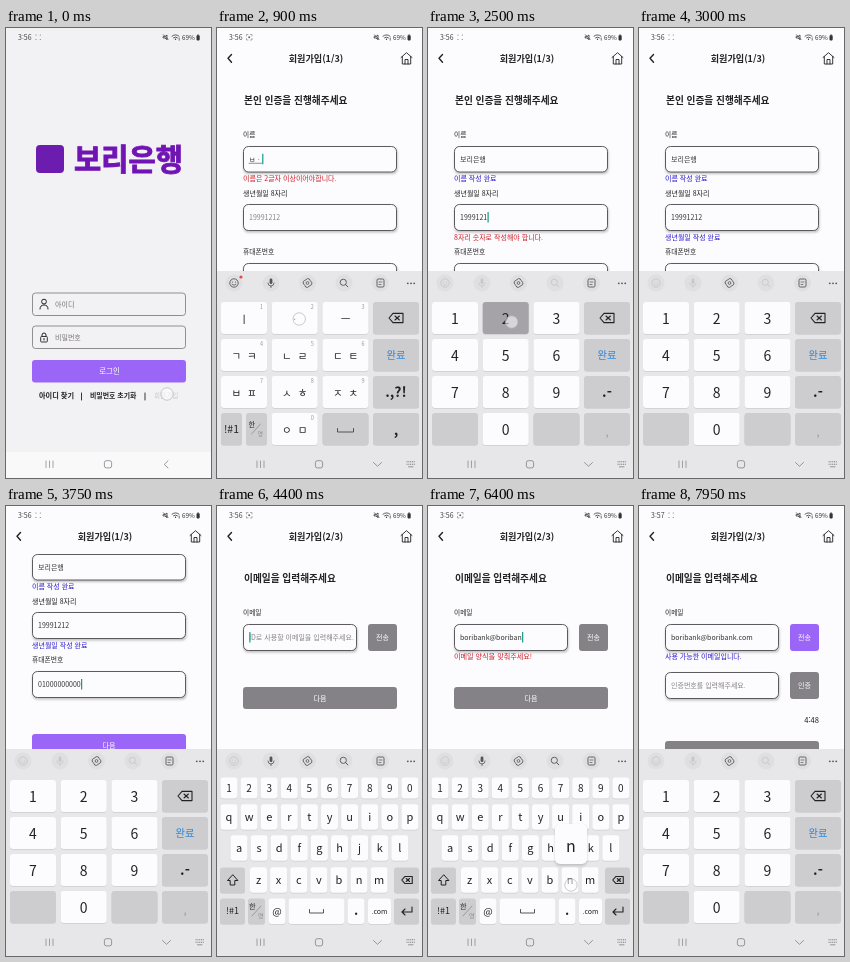
An HTML page that plays this animation: 205x450 px, repeating every 8 s.

```html
<!DOCTYPE html>
<html lang="ko">
<head>
<meta charset="utf-8">
<title>회원가입</title>
<style>
  html, body { margin: 0; width: 100%; height: 100%; overflow: hidden; background: #fcfbfd; }
  svg { display: block; width: 100vw; height: 100vh; }
  text { font-family: "Noto Sans CJK KR", "Noto Sans CJK JP", "Noto Sans CJK", "Noto Sans", sans-serif; white-space: pre; }
</style>
</head>
<body>
<svg id="stage" viewBox="0 0 205 450" preserveAspectRatio="none">
  <defs>
    <clipPath id="body"><rect y="48" width="205" height="402"/></clipPath>
    <filter id="soft" x="-10%" y="-30%" width="120%" height="180%"><feGaussianBlur stdDeviation="1"/></filter>
  </defs>
  <g id="scene"></g>
</svg>
<script>
const LOOP = 8000;
const INK = '#222', GRAY = '#858287', PURPLE = '#9b66f7', RED = '#cc1f2a', BLUE = '#2b1bd0';
const PAGE = '#fcfbfd', BOARD = '#e7e7e9', KEY = '#fcfbfd', FUNC = '#cdcccf', ICON = '#555';
const BANK = '보리은행', MAIL = 'boribank@boribank.com';
const scene = document.getElementById('scene');
const pen = document.createElement('canvas').getContext('2d');

const clamp = (v) => Math.max(0, Math.min(1, v));
const ease = (t, a, b) => { const p = clamp((t - a) / (b - a)); return p * p * (3 - 2 * p); };
const between = (t, a, b) => t >= a && t < b;

// Drawing helpers: text is centred vertically on y
const text = (x, y, s, size, fill = INK, anchor = 'start', weight = 500) =>
  `<text x="${x}" y="${y + size * 0.36}" font-size="${size}" fill="${fill}" text-anchor="${anchor}" font-weight="${weight}">${s}</text>`;
const mid = (x, y, s, size, fill, weight) => text(x, y, s, size, fill, 'middle', weight);
const rect = (x, y, w, h, fill, r = 0, extra = '') =>
  `<rect x="${x}" y="${y}" width="${w}" height="${h}" rx="${r}" fill="${fill}" ${extra}/>`;
const circle = (x, y, r, fill, extra = '') => `<circle cx="${x}" cy="${y}" r="${r}" fill="${fill}" ${extra}/>`;
const line = (d, color = INK, w = 1) =>
  `<path d="${d}" fill="none" stroke="${color}" stroke-width="${w}" stroke-linecap="round" stroke-linejoin="round"/>`;
const group = (s, y = 0, opacity = 1) => `<g transform="translate(0 ${y})" opacity="${opacity}">${s}</g>`;
const ring = (x, y) => circle(x, y, 6.2, '#fff', 'fill-opacity=".55" stroke="#b3b1b5" stroke-width=".7"');
const button = (x, y, w, h, s, on) => rect(x, y, w, h, on ? PURPLE : GRAY, 3) + mid(x + w / 2, y + h / 2, s, 7, '#fff');
const width = (s, size) => {
  pen.font = `500 ${size}px "Noto Sans CJK KR", "Noto Sans CJK JP", "Noto Sans CJK", "Noto Sans", sans-serif`;
  return pen.measureText(s).width;
};

function field(x, y, w, h, value, hint, focus, blink, compose = 0) {
  let s = rect(x + 0.5, y + 1.6, w, h, '#77747a', 5, 'opacity=".45" filter="url(#soft)"');
  s += rect(x + 0.5, y + 0.5, w - 1, h - 1, PAGE, 5, 'stroke="#4c4a4e" stroke-width=".9"');
  s += text(x + 6, y + h / 2, value || hint, 7, value ? '#333' : '#858287');
  const end = x + 6 + width(value, 7);
  if (compose) {
    const from = x + 6 + width(value.slice(0, -compose), 7);
    s += line(`M${from} ${y + h / 2 + 4}H${end}`, '#444', 0.6);
  }
  if (focus && blink) s += rect(end + 0.3, y + h / 2 - 5.5, 1.2, 10.5, '#159a8b');
  return s;
}

// Typing plans
const PLUS = [
  ['ㅂ', 0, 2], ['ㅂㆍ', 1, 0], ['보', 2, 0], ['본', 1, 1], ['볼', 1, 1], ['보리', 0, 0],
  ['보링', 1, 3], ['보리으', 2, 0], ['보리은', 1, 1], ['보리은ㅅ', 1, 2], ['보리은ㅎ', 1, 2],
  ['보리은히', 0, 0], ['보리은하', 1, 0], ['보리은해', 0, 0], [BANK, 1, 3]
];
const BIRTH = '19991212', PHONE = '01000000000';
const nameAt = (i) => 840 + 50 * i;
const birthAt = (i) => i ? 1680 + 120 * i : 1725;
const phoneAt = (i) => 3270 + 44 * i;
const mailAt = (i) => i < 17 ? 4850 + 103 * i : 6620;
const count = (t, n, at) => { let i = 0; while (i < n && t >= at(i)) i++; return i; };
const colX = [27, 77.7, 128.5, 179], rowY = [290, 327, 364, 401];
const digitCell = (d) => +d ? [(d - 1) % 3, Math.floor((d - 1) / 3)] : [1, 3];

const ROWS = [['1234567890', 12, 282], ['qwertyuiop', 12, 311], ['asdfghjkl', 22, 342], ['zxcvbnm', 41.5, 374]];
function letterKey(c) {
  if (c === '@') return [60, 405];
  for (const [keys, x, y] of ROWS) if (keys.includes(c)) return [x + 20.1 * keys.indexOf(c), y];
}

// Which key is down now
function pressed(t) {
  const i = count(t, PLUS.length, nameAt) - 1;
  if (i >= 0 && t < nameAt(i) + 42) return { cell: PLUS[i].slice(1) };
  for (const [s, at, lead] of [[BIRTH, birthAt, 60], [PHONE, phoneAt, 34]]) {
    const n = count(t, s.length, at);
    if (n < s.length && t >= at(n) - lead && t > 1740) return { cell: digitCell(s[n]), dark: true };
  }
  const m = count(t, MAIL.length, mailAt) - 1;
  if (m >= 0 && m < 17 && t < mailAt(m) + 75) return { letter: MAIL[m] };
  if (between(t, 6620, 6700)) return { spot: [162, 405] };
  return {};
}

// Chrome
function statusBar(t) {
  let s = text(12, 9.3, t < 6700 ? '3:56' : '3:57', 7, '#444');
  const rec = t % 600;
  if (between(rec, 175, 475)) {
    s += line('M29.5 8V6.5H31M33.5 6.5H35V8M35 10.5V12H33.5M31 12H29.5V10.5', '#777', 0.6) + circle(32.2, 9.2, 1, '#666');
  } else {
    for (const [x, y] of [[30, 7], [34.3, 7], [30, 11.5], [34.3, 11.5]]) s += circle(x, y, 0.6, '#777');
  }
  s += line('M157.5 8.6H158.8L161 7V11.6L158.8 10H157.5ZM157.5 6.8L162 11.6', '#333', 0.8);
  s += line('M166 8.2Q169.5 5.4 173 8.2M167.5 9.8Q169.5 8.2 171.5 9.8', '#333', 0.8) + circle(169.5, 11.3, 0.7, '#333') + line('M173.2 10V12.2', '#333', 0.7);
  return s + text(176, 9.4, '69%', 6.3, '#333') + rect(190.5, 7.2, 3.2, 5.2, '#333', 0.8) + rect(191.4, 6.5, 1.4, 1, '#333');
}

function navBar(k) {
  const c = '#807e82';
  let s = line('M40 433V439.5M43.5 433V439.5M47 433V439.5', c, 0.7);
  s += rect(98.4, 432.7, 7.2, 7.2, 'none', 2, `stroke="${c}" stroke-width=".8"`);
  s += k > 0.5 ? line('M156.5 434.5L160.5 438.3L164.5 434.5', c, 0.8) : line('M162 432.8L158.3 436.4L162 440', c, 0.8);
  if (k > 0.5) {
    for (const y of [433.8, 436.2]) s += `<path d="M189.5 ${y}H198" stroke="${c}" stroke-width="1.1" stroke-dasharray="1.1 .7"/>`;
    s += line('M191.5 438.8H196', c, 0.8);
  }
  return s;
}

const header = (n) => line('M14.5 26.5L11 30.3L14.5 34.2', INK, 1.4) + mid(99, 30.3, `회원가입(${n}/3)`, 9.1, INK, 700) +
  line('M184 29.5L189.5 24.7L195 29.5M185.3 28.5V36H193.7V28.5M188 36V31.5H191V36', INK, 0.9);

// Pages
function login() {
  let s = rect(0, 0, 205, 424, '#f2f1f3') + rect(0, 424, 205, 26, '#f9f9fa');
  s += rect(30, 117, 28, 28, '#6d1cb0', 4);
  s += `<g stroke="#7114b4" stroke-width=".9">${text(68, 131, BANK, 29.6, '#7114b4', 'start', 900)}</g>`;
  const rows = [[265, '아이디'], [298, '비밀번호']];
  for (const [y, label] of rows) {
    s += rect(26.5, y, 153, 22.5, '#f2f1f3', 3, 'stroke="#77747a" stroke-width=".8"') + text(49, y + 11.2, label, 7, '#77747a');
  }
  s += circle(38, 273.6, 2.4, 'none', `stroke="${INK}"`) + line('M34 281Q34 277 38 277Q42 277 42 281');
  s += rect(34.7, 308.5, 6.6, 5.5, 'none', 0.8, `stroke="${INK}" stroke-width=".9"`) + line('M36 308V307Q36 305 38 305Q40 305 40 307V308M38 310.5V312');
  s += rect(26, 332, 154, 22.5, PURPLE, 3) + mid(103.5, 343, '로그인', 7.5, '#fff');
  s += text(33, 367.5, '아이디 찾기', 7.2, INK, 'start', 700) + text(84, 367.5, '비밀번호 초기화', 6.9, INK, 'start', 700);
  return s + line('M75.5 365V372M139 365V372', INK, 0.9) + text(148, 367.5, '회원가입', 6.6, '#c9c7cb');
}

function identity(t, blink) {
  const step = count(t, PLUS.length, nameAt);
  const name = step ? PLUS[step - 1][0] : '';
  const birth = BIRTH.slice(0, count(t, BIRTH.length, birthAt));
  const phone = PHONE.slice(0, count(t, PHONE.length, phoneAt));
  const composing = t < 1600 && name ? (step === 2 ? 2 : 1) : 0;
  let s = text(27, 72.5, '본인 인증을 진행해주세요', 9.7, INK, 'start', 700);
  s += text(26, 107, '이름', 6.7) + field(26, 118, 154, 26.5, name, '이름', between(t, 420, 1700), blink, composing);
  if (step) s += step < 6 ? text(26, 150, '이름은 2글자 이상이어야합니다.', 7, RED) : text(26, 150, '이름 작성 완료', 7, BLUE);
  s += text(26, 165.5, '생년월일 8자리', 7) + field(26, 176, 154, 27, birth, '19991212', between(t, 1700, 2850), blink);
  if (birth) s += birth.length < 8 ? text(26, 209, '8자리 숫자로 작성해야 합니다.', 7, RED) : text(26, 209, '생년월일 작성 완료', 7, BLUE);
  s += text(26, 224, '휴대폰번호', 6.8) + field(26, 235, 154, 27, phone, "'-' 없이 입력해주세요.", between(t, 2850, 3800), blink);
  s += button(26, 298, 154, 22, '다음', phone.length === PHONE.length);
  const scroll = 70 * ease(t, 3060, 3240);
  return rect(0, 0, 205, 450, PAGE) + `<g clip-path="url(#body)">${group(s, -scroll)}</g>` + header(1);
}

function email(t, blink) {
  const n = count(t, MAIL.length, mailAt), value = MAIL.slice(0, n), full = n === MAIL.length;
  const sent = t >= 7050;
  let s = rect(0, 0, 205, 450, PAGE) + header(2);
  s += text(27, 72.5, '이메일을 입력해주세요', 9.7, INK, 'start', 700) + text(26, 107, '이메일', 6.7);
  s += field(26, 118, 114, 27, value, 'ID로 사용할 이메일을 입력해주세요.', between(t, 4250, 7390), blink);
  s += button(151, 118, 29, 27, '전송', full);
  if (n) s += full ? text(26, 150, '사용 가능한 이메일입니다.', 7, BLUE) : text(26, 150, '이메일 양식을 맞춰주세요!', 7.1, RED);
  if (!sent) return s + button(26, 181, 154, 22, '다음');
  s += field(26, 166, 114, 27, '', '인증번호를 입력해주세요.', t >= 7390, blink) + button(151, 166, 29, 27, '인증');
  s += text(180, 214, '4:' + (52 - Math.min(4, Math.floor((t - 7050) / 210))), 7.6, INK, 'end');
  return s + button(26, 235, 154, 22, '다음');
}

// Keyboards
function toolbar(mode) {
  const tone = (on) => on ? ICON : '#c9c7cb';
  const plus = mode === 'plus', num = mode === 'num';
  let s = '';
  for (const x of [17, 54, 90.5, 127, 163.5]) s += circle(x, 255, 8.5, '#dfdee1');
  let c = tone(plus);
  s += circle(17, 255, 4.2, 'none', `stroke="${c}" stroke-width=".9"`) + circle(15.5, 254, 0.6, c) + circle(18.5, 254, 0.6, c) + line('M15 256.3Q17 258.6 19 256.3', c, 0.8);
  if (plus) s += circle(24, 249, 1.6, '#e5484d');
  c = tone(!num);
  s += rect(52.6, 250.5, 2.8, 5.6, c, 1.4) + line('M50.9 255Q51 258 54 258Q57 258 57.1 255M54 258V259.6', c, 0.8);
  const gear = Array.from({ length: 16 }, (_, i) => {
    const a = i * Math.PI / 8, r = i % 4 < 2 ? 4.4 : 3.7;
    return `${(90.5 + r * Math.cos(a)).toFixed(2)} ${(255 + r * Math.sin(a)).toFixed(2)}`;
  });
  s += line(`M${gear.join('L')}Z`, ICON, 0.9) + circle(90.5, 255, 1.4, 'none', `stroke="${ICON}" stroke-width=".8"`);
  s += circle(126.3, 254.3, 3.1, 'none', `stroke="${c}" stroke-width=".9"`) + line('M128.6 256.6L130.8 258.8', c);
  s += rect(160, 251, 7, 8, 'none', 1.2, `stroke="${ICON}" stroke-width=".9"`) + line('M162 254H165M162 256.5H164', ICON, 0.7);
  for (const x of [190.8, 194, 197.2]) s += circle(x, 255.3, 0.9, ICON);
  return s;
}

const key = (x, y, w, h, fill = KEY) => rect(x, y + 0.8, w, h, '#c3c1c5', 3, 'opacity=".7"') + rect(x, y, w, h, fill, 3);
const erase = (x, y, k) => line(`M${x - 7 * k} ${y}L${x - 3 * k} ${y - 4.6 * k}H${x + 7 * k}V${y + 4.6 * k}H${x - 3 * k}ZM${x - k} ${y - 2 * k}L${x + 3.4 * k} ${y + 2 * k}M${x + 3.4 * k} ${y - 2 * k}L${x - k} ${y + 2 * k}`, INK, 1.1);
const space = (x, y, w) => line(`M${x - w} ${y - 1.5}V${y + 2}H${x + w}V${y - 1.5}`, '#444', 0.9);
const lang = (x, y) => text(x - 8, y - 5, '한', 7.2) + line(`M${x - 5} ${y + 5}L${x + 4} ${y - 5}`, '#777', 0.6) + text(x + 1, y + 5, '영', 6, '#888');

function pad(mode, hit) {
  const plus = mode === 'plus';
  const jamo = ['ㅣ', 'ㆍ', 'ㅡ', 'ㄱㅋ', 'ㄴㄹ', 'ㄷㅌ', 'ㅂㅍ', 'ㅅㅎ', 'ㅈㅊ'];
  let s = '';
  rowY.forEach((y, r) => colX.forEach((x, c) => {
    if (plus && r === 3 && c === 0) {
      s += key(4, 385, 21, 32, FUNC) + mid(14.5, 401, '!#1', 10.5) + key(29, 385, 21, 32, FUNC) + lang(39.5, 401);
      return;
    }
    const func = c === 3 || (r === 3 && c !== 1);
    const down = hit.cell && hit.cell[0] === c && hit.cell[1] === r;
    s += key(x - 23, y - 16, 46, 32, down && hit.dark ? '#a5a3a7' : func ? FUNC : KEY);
    if (func) return;
    const i = r === 3 ? 0 : r * 3 + c + 1;
    if (!plus) s += mid(x, y + 0.6, i, 14);
    else {
      const label = r === 3 ? 'ㅇㅁ' : jamo[i - 1];
      s += mid(x, y + 1.5, [...label].join('  '), 10.5) + mid(x + 17.5, y - 11, i, 5.5, '#99979b');
    }
  }));
  s += erase(179, 290, 1) + mid(179, 327, '완료', 10.3, '#2786dd');
  s += plus ? mid(179, 364, '.,?!', 14, INK, 700) + space(128.5, 402, 8) + mid(179, 402, ',', 14, INK, 700)
            : mid(179, 364, '.-', 14, INK, 700) + mid(179, 404, ',', 11, '#99979b');
  if (hit.cell) s += hit.dark ? ring(colX[hit.cell[0]] + 6, rowY[hit.cell[1]] + 4) : ring(colX[hit.cell[0]] + 4.5, rowY[hit.cell[1]] + 1);
  return s;
}

function qwerty(hit) {
  let s = '';
  ROWS.forEach(([keys, x0, y], r) => [...keys].forEach((c, i) => {
    const x = x0 + 20.1 * i, h = r ? 25.5 : 21;
    s += key(x - 8.5, y - h / 2, 17, h) + mid(x, y + 0.5, c, r ? 11 : 10);
  }));
  s += key(3, 361.5, 25, 25.5, FUNC) + line('M15.5 369L10.5 374.5H13.2V379H17.8V374.5H20.5Z') + key(177, 361.5, 25, 25.5, FUNC) + erase(190, 374, 0.75);
  s += key(3, 392.5, 25, 25.5, FUNC) + mid(15.5, 405, '!#1', 9);
  s += key(31, 392.5, 17, 25.5, FUNC) + lang(40, 405) + key(51.5, 392.5, 17, 25.5) + mid(60, 405, '@', 10);
  s += key(71.5, 392.5, 56, 25.5) + space(99.5, 405, 7) + key(130.5, 392.5, 17, 25.5) + mid(139, 404, '.', 13, INK, 700);
  s += key(151, 392.5, 23, 25.5) + mid(162.5, 405, '.com', 7);
  s += key(177, 392.5, 25, 25.5, FUNC) + line('M195 401V406H185M188 403L185 406L188 409', INK, 1.1);
  if (hit.letter) {
    const [x, y] = letterKey(hit.letter), px = Math.max(18, Math.min(187, x + 1));
    s += rect(px - 16, y - 55, 32, 41, '#aaa8ac', 5, 'opacity=".6" filter="url(#soft)"') + rect(px - 16, y - 56, 32, 40, KEY, 5);
    s += mid(px, y - 34, hit.letter, 16) + ring(x + 1, y + 5);
  }
  return s + (hit.spot ? ring(...hit.spot) : '');
}

const TAPS = [[0, 90, 161, 366], [360, 430, 95, 132], [1650, 1700, 82, 190], [2800, 2860, 90, 238],
  [3940, 4040, 103, 239], [4220, 4300, 82, 132], [6900, 6980, 166, 132], [7340, 7390, 82, 180]];

function render(t) {
  const blink = t % 500 < 425;
  const k = ease(t, 430, 600) - ease(t, 3800, 3930) + ease(t, 4290, 4395);
  const mode = t < 1725 ? 'plus' : t < 4200 || t >= 7400 ? 'num' : 'mail';
  let s = '';
  if (t < 250) s += login();
  if (between(t, 110, 4180)) s += group(identity(t, blink), 0, ease(t, 110, 240));
  if (t >= 4050) s += group(email(t, blink), 0, ease(t, 4050, 4170));
  if (k > 0) {
    const hit = pressed(t);
    const keys = mode === 'mail' ? qwerty(hit) : pad(mode, hit);
    s += group(rect(0, 243, 205, 207, BOARD) + toolbar(mode) + keys, (1 - k) * 182);
    s += rect(0, 424, 205, 26, BOARD, 0, `opacity="${k}"`);
  }
  s += statusBar(t) + navBar(k);
  for (const [a, b, x, y] of TAPS) if (between(t, a, b)) s += ring(x, y);
  scene.innerHTML = s;
}

const start = performance.now();
function tick() {
  render((performance.now() - start) % LOOP);
  requestAnimationFrame(tick);
}
tick();
</script>
</body>
</html>
```
